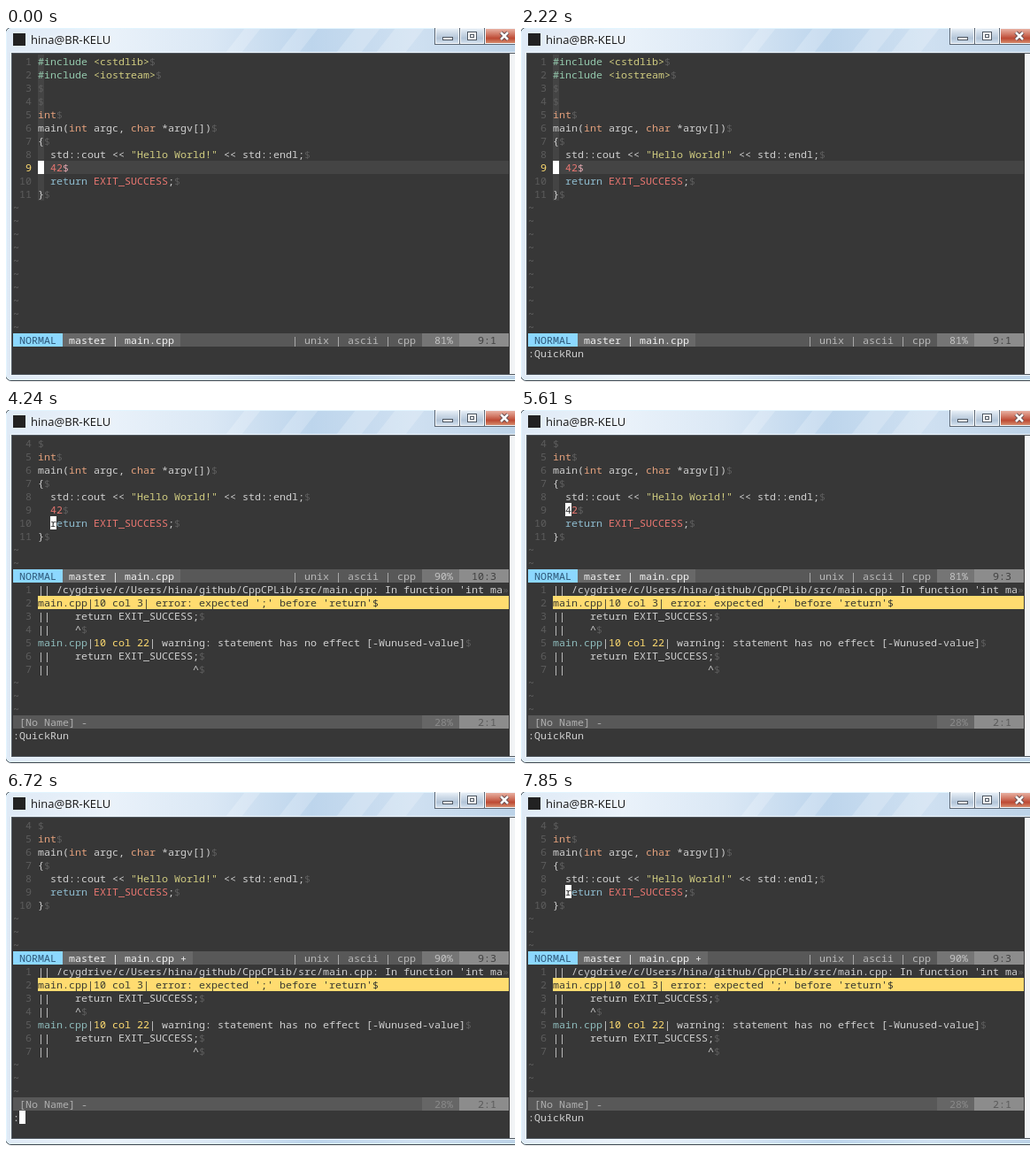
An HTML page with a canvas that plays this animation: 575x400 px, repeating every 8000 ms.

```html
<!DOCTYPE html>
<html lang="en">
<head>
<meta charset="utf-8">
<title>Terminal session</title>
<style>
html, body { margin: 0; width: 100%; height: 100%; overflow: hidden; }
canvas { display: block; }
</style>
</head>
<body>
<canvas id="stage" width="575" height="400"></canvas>
<script>
const ctx = document.getElementById('stage').getContext('2d');
const LOOP = 8000, CELL_W = 7, CELL_H = 15;
const MONO = '11.667px "Noto Sans Mono", "DejaVu Sans Mono", monospace';
const PATH = '/cygdrive/c/Users/hina/github/CppCPLib/src/main.cpp';

const C = {
  bg: '#373737', line: '#444444', text: '#d0d0d0', dim: '#5c5c5c',
  pre: '#94c9ad', str: '#d0cc80', type: '#e3a07c', key: '#8fbdd0', num: '#e87670',
  pink: '#dca4ac', file: '#8fbcbc', gold: '#ffdc70', ink: '#3a3a30'
};

const colX = col => 8 + col * CELL_W;
const rowY = row => 30 + (row - 1) * CELL_H;

function box(x, y, w, h, fill) {
  ctx.fillStyle = fill;
  ctx.fillRect(x, y, w, h);
}

function cells(row, col, count, fill) {
  box(colX(col), rowY(row), count * CELL_W, CELL_H, fill);
}

function put(row, col, text, color) {
  ctx.font = MONO;
  ctx.fillStyle = color;
  for (const ch of text) {
    if (ch !== ' ') ctx.fillText(ch, colX(col), rowY(row) + 12);
    col++;
  }
  return col;
}

// parts alternate between a colour name and the text in it
function putParts(row, col, parts) {
  for (let i = 0; i < parts.length; i += 2) col = put(row, col, parts[i + 1], C[parts[i]]);
}

function numbered(row, n, parts, color = C.dim) {
  put(row, 1, String(n).padStart(2), color);
  putParts(row, 4, parts);
}

function cursor(row, col, ch = ' ') {
  cells(row, col, 1, '#ffffff');
  put(row, col, ch, '#303030');
}

function tildes(from, to) {
  for (let row = from; row <= to; row++) put(row, 0, '~', '#686868');
}

// highlights the current row and column of a window
function crosshair(current, last) {
  box(colX(4), rowY(1), CELL_W, last * CELL_H, C.line);
  cells(current, 4, 76, C.line);
}

const source = [
  ['pre', '#include ', 'str', '<cstdlib>', 'dim', '$'],
  ['pre', '#include ', 'str', '<iostream>', 'dim', '$'],
  ['dim', '$'],
  ['dim', '$'],
  ['type', 'int', 'dim', '$'],
  ['text', 'main(', 'type', 'int', 'text', ' argc, ', 'type', 'char', 'text', ' *argv[])', 'dim', '$'],
  ['text', '{', 'dim', '$'],
  ['text', '  std::cout << ', 'str', '"Hello World!"', 'text', ' << std::endl;', 'dim', '$'],
  ['num', '  42', 'dim', '$'],
  ['key', '  return ', 'num', 'EXIT_SUCCESS', 'text', ';', 'dim', '$'],
  ['text', '}', 'dim', '$']
];
const currentLine = ['num', '  42', 'pink', '$'];

const report = [
  ['text', '|| ' + PATH + ": In function 'int ma", 'dim', '»'],
  ['ink', "main.cpp|10 col 3| error: expected ';' before 'return'$"],
  ['text', '||    return EXIT_SUCCESS;', 'dim', '$'],
  ['text', '||    ^', 'dim', '$'],
  ['file', 'main.cpp', 'text', '|', 'gold', '10 col 22', 'text',
    '| warning: statement has no effect [-Wunused-value]', 'dim', '$'],
  ['text', '||    return EXIT_SUCCESS;', 'dim', '$'],
  ['text', '||' + ' '.repeat(23) + '^', 'dim', '$']
];

function statusRight(row, percent, pos, active) {
  cells(row, 66, 6, active ? '#757575' : '#666666');
  cells(row, 72, 8, '#8c8c8c');
  put(row, 68, percent, active ? '#c4c4c4' : '#8a8a8a');
  put(row, 78 - pos.length, pos, active ? '#404040' : '#5a5a5a');
}

function activeStatus(row, file, percent, pos) {
  cells(row, 0, 80, '#585858');
  cells(row, 0, 8, '#8cd8ff');
  cells(row, 8, file.length + 11, '#686868');
  put(row, 1, 'NORMAL', '#2d5878');
  put(row, 9, 'master | ' + file, '#f0f0f0');
  put(row, 45, '| unix | ascii | cpp', '#b8b8b8');
  statusRight(row, percent, pos, true);
}

function idleStatus(row, label, percent, pos) {
  cells(row, 0, 80, '#585858');
  put(row, 1, label, '#b0b0b0');
  statusRight(row, percent, pos, false);
}

function editor() {
  crosshair(9, 11);
  source.forEach((parts, i) => {
    if (i === 8) numbered(9, 9, currentLine, C.gold);
    else numbered(i + 1, i + 1, parts);
  });
  tildes(12, 21);
  activeStatus(22, 'main.cpp', '81%', '9:1');
}

function splitTop(fresh, removed) {
  const lines = source.slice(3);
  if (removed) lines.splice(5, 1);
  if (fresh) crosshair(6, 8);
  lines.forEach((parts, i) => {
    if (fresh && i === 5) numbered(6, 9, currentLine, '#eeeeee');
    else numbered(i + 1, i + 4, parts);
  });
  tildes(lines.length + 1, 10);
}

function splitBottom(fresh) {
  cells(13, fresh ? 5 : 4, fresh ? 75 : 76, C.gold);
  report.forEach((parts, i) => numbered(12 + i, i + 1, parts));
  if (fresh) put(13, 4, 'm', '#eeeeee');
  tildes(19, 21);
  if (fresh) {
    cells(22, 0, 80, '#8a8a8a');
    put(22, 0, '<-only "' + PATH + '" 2,1', '#2a2a2a');
    put(22, 77, 'All', '#2a2a2a');
  } else {
    idleStatus(22, '[No Name] -', '28%', '2:1');
  }
}

// command text and cursor [row, col, character] from each moment on
const steps = [
  [0, '', 9, 4],
  [680, ':', 23, 1],
  [1240, ':Q', 23, 2],
  [1490, ':Qu', 23, 3],
  [1640, ':QuickRun', 23, 9],
  [2070, ':QuickRun', 23, 0, ':'],
  [2220, ':QuickRun', 9, 4],
  [2680, ':QuickRun'],
  [4240, ':QuickRun', 7, 6, 'r'],
  [5610, ':QuickRun', 6, 6, '4'],
  [6040, ':QuickRun', 6, 6, 'r'],
  [6720, ':', 23, 1],
  [7150, ':Q', 23, 2],
  [7300, ':Qu', 23, 3],
  [7420, ':QuickRun', 23, 9],
  [7850, ':QuickRun', 6, 6, 'r']
];

function gradient(x0, y0, x1, y1, colors) {
  const g = ctx.createLinearGradient(x0, y0, x1, y1);
  colors.forEach((color, i) => g.addColorStop(i / (colors.length - 1), color));
  return g;
}

function streak(x, width) {
  ctx.fillStyle = 'rgba(255,255,255,0.2)';
  ctx.beginPath();
  ctx.moveTo(x, 0);
  ctx.lineTo(x + width, 0);
  ctx.lineTo(x + width - 22, 28);
  ctx.lineTo(x - 22, 28);
  ctx.fill();
}

// rounded outline, inset from the outer edge of the window
function outline(inset) {
  ctx.beginPath();
  ctx.roundRect(inset - 1, inset - 1, 620, 400 - inset * 2, 7 - inset);
}

function windowButton(x, w, colors) {
  box(x, 0, w, 19, '#5d6875');
  box(x + 1, 0, w - 2, 18, '#f4f8fc');
  box(x + 2, 1, w - 4, 16, gradient(0, 1, 0, 17, colors));
}

function frame() {
  box(0, 0, 575, 400, '#ffffff');
  ctx.save();
  outline(0);
  ctx.clip();
  box(0, 0, 575, 400, gradient(0, 0, 575, 0,
    ['#dfeaf6', '#eaf2fa', '#dbe8f5', '#bdd5ec', '#cfe0f1', '#bdd3e8']));
  [270, 330, 395, 440].forEach((x, i) => streak(x, 18 + i * 5));
  ctx.restore();
  ctx.lineWidth = 1;
  for (const [inset, color] of [[0.5, '#3c444c'], [1.5, '#e2f5ff']]) {
    ctx.strokeStyle = color;
    outline(inset);
    ctx.stroke();
  }
  box(5, 27, 570, 366, '#eef5fb');
  box(6, 28, 569, 364, '#505860');
  box(569, 29, 6, 362, '#f2f4f6');

  box(8, 6, 14, 14, '#222222');
  ctx.font = '13px "Open Sans", "Noto Sans", sans-serif';
  ctx.shadowColor = '#ffffff';
  ctx.shadowBlur = 7;
  ctx.fillStyle = '#151515';
  ctx.fillText('hina@BR-KELU', 28, 18);
  ctx.shadowBlur = 0;

  const glass = ['#e6eef6', '#cbd8e6', '#b3c5d8', '#d0deec'];
  windowButton(484, 29, glass);
  windowButton(512, 29, glass);
  windowButton(540, 46, ['#e8b0a2', '#d47f6c', '#bd4a34', '#d58a6c']);
  box(493, 10, 12, 4, '#4d5661');
  box(494, 11, 10, 2, '#ffffff');
  ctx.lineWidth = 1;
  ctx.strokeStyle = '#4d5661';
  box(521, 4, 11, 10, '#ffffff');
  ctx.strokeRect(521.5, 4.5, 10, 9);
  ctx.strokeRect(524.5, 7.5, 4, 3);
  for (const [width, color] of [[4.5, '#5a4448'], [2.5, '#ffffff']]) {
    ctx.lineWidth = width;
    ctx.strokeStyle = color;
    ctx.beginPath();
    ctx.moveTo(559, 5);
    ctx.lineTo(567, 13);
    ctx.moveTo(567, 5);
    ctx.lineTo(559, 13);
    ctx.stroke();
  }
}

function draw(t) {
  frame();
  box(7, 29, 562, 362, C.bg);
  if (t < 2680) {
    editor();
  } else {
    const fresh = t < 4240, removed = t >= 6040;
    splitTop(fresh, removed);
    if (fresh) idleStatus(11, 'main.cpp', '81%', '9:1');
    else if (t < 5610) activeStatus(11, 'main.cpp', '90%', '10:3');
    else activeStatus(11, removed ? 'main.cpp +' : 'main.cpp', removed ? '90%' : '81%', '9:3');
    splitBottom(fresh);
  }
  const [, command, row, col, ch] = steps.filter(step => step[0] <= t).pop();
  put(23, 0, command, C.text);
  if (t >= 5890 && t < 6040) put(24, 69, 'd', C.text);
  if (row) cursor(row, col, ch);
}

const start = performance.now();
function tick() {
  draw((performance.now() - start) % LOOP);
  requestAnimationFrame(tick);
}
tick();
</script>
</body>
</html>
```
